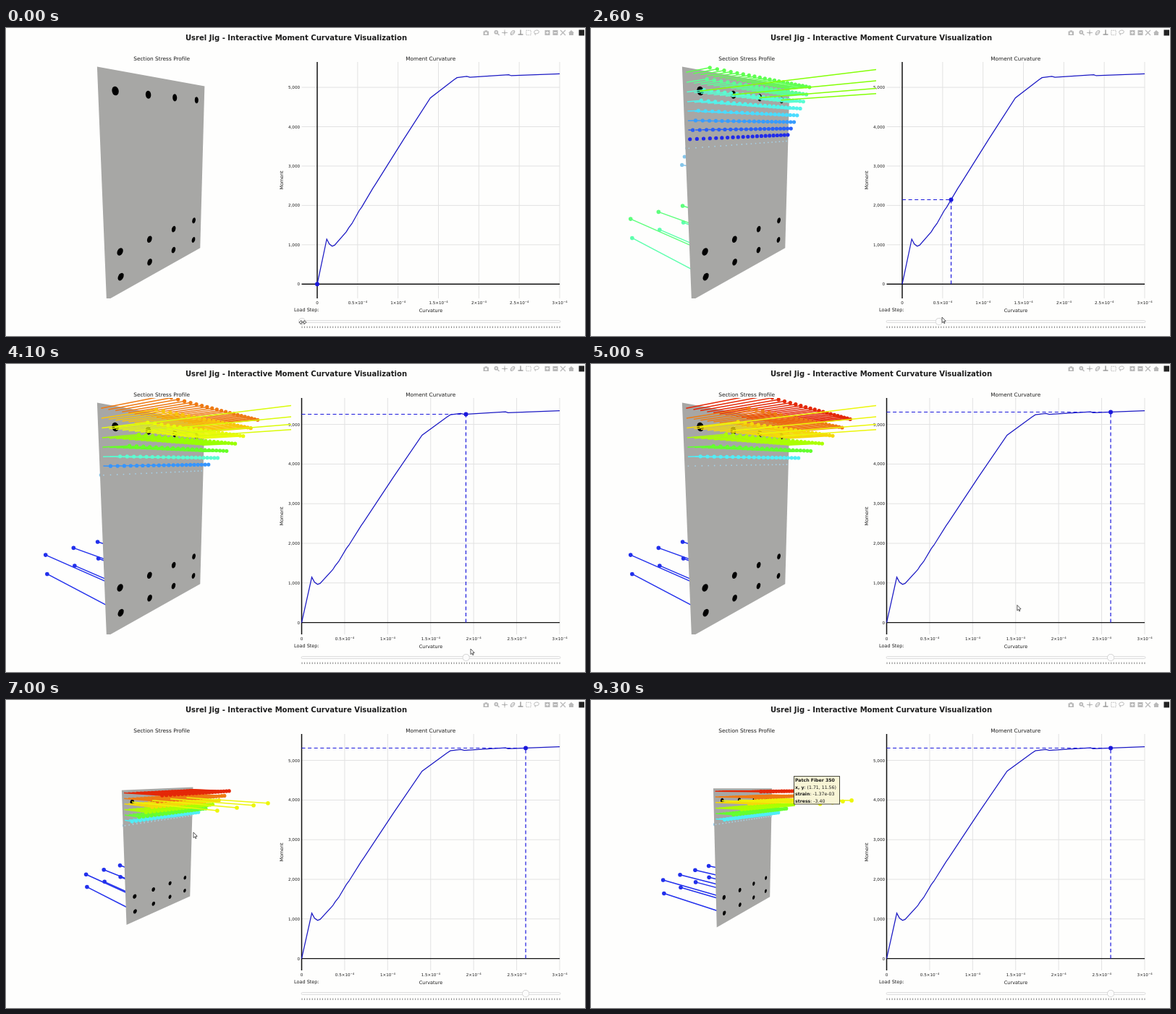
Recreate the animation shown at these times as an HTML page with a canvas. Size 800x426 px, loop 9.4 s.

```html
<!DOCTYPE html>
<html lang="en">
<head>
<meta charset="utf-8">
<title>Moment Curvature</title>
<style>
html, body { margin: 0; width: 100%; height: 100%; overflow: hidden; background: #fefefd; }
canvas { display: block; width: 800px; height: 426px; }
</style>
</head>
<body>
<canvas id="stage" width="800" height="426"></canvas>
<script>
const ctx = document.getElementById('stage').getContext('2d');
const LOOP = 9400, STEP = 100, RESCALE = 3000, TIP_START = 8300;
const FONT = '"DejaVu Sans", Verdana, sans-serif';
const BLUE = '#1a18dc';

// Keyed values: [time, ...values]
const CURVATURE = [[0, 0], [900, 0], [1900, .3], [2600, .605], [4100, 1.91], [4900, 2.605]];
const CAMERA = [[0, 48.5, 10.9, 35.3], [5300, 48.5, 10.9, 35.3], [5900, 32.6, 22, 35.3],
  [6400, 34, 21, 55], [7000, 44.8, 15.05, 55], [7800, 54.1, 12.6, 55]];
const POINTER = [[0, 410, 407], [900, 410, 407], [1900, 449, 406], [2600, 485, 400], [4100, 642, 394],
  [4900, 722, 398], [5250, 256, 172], [5900, 268, 202], [6400, 268, 202], [7000, 259, 183],
  [7800, 252, 176], [8300, 281, 125]];
// Curvature to neutral axis height, and curvature to moment
const AXIS = [[0, 0], [.12, .1], [.2, 3.4], [.3, 4.25], [.605, 4.95], [1.91, 5.57], [2.6, 6.29]];
const MOMENT = [[0, 0], [.118, 1145], [.15, 1020], [.185, 965], [.215, 990], [.36, 1330], [.39, 1430],
  [.43, 1540], [.52, 1870], [.55, 1955], [.69, 2440], [.725, 2550], [1.07, 3680], [1.4, 4730],
  [1.69, 5190], [1.73, 5245], [1.85, 5278], [1.89, 5255], [2.37, 5320], [2.4, 5295], [3, 5345]];
const RAMP = [[30, 20, 230], [44, 115, 252], [78, 235, 255], [92, 255, 205], [95, 255, 60], [115, 255, 10],
  [165, 255, 0], [235, 250, 10], [250, 200, 10], [238, 122, 20], [228, 40, 8]];

const clamp = (v, a, b) => Math.min(b, Math.max(a, v));

function at(keys, t) {
  const i = keys.findIndex(k => k[0] > t);
  if (i < 0) return keys[keys.length - 1].slice(1);
  const a = keys[i - 1], b = keys[i], f = (t - a[0]) / (b[0] - a[0]);
  return a.slice(1).map((v, j) => v + (b[j + 1] - v) * f);
}

function ramp(t) {
  const s = clamp(t, 0, 1) * (RAMP.length - 1), i = Math.min(Math.floor(s), RAMP.length - 2);
  return `rgb(${RAMP[i].map((v, j) => Math.round(v + (RAMP[i + 1][j] - v) * (s - i)))})`;
}

function path(points, close) {
  ctx.beginPath();
  points.forEach(p => ctx.lineTo(p[0], p[1]));
  if (close) ctx.closePath();
}

function line(x1, y1, x2, y2, color, width = 1) {
  path([[x1, y1], [x2, y2]]);
  ctx.strokeStyle = color;
  ctx.lineWidth = width;
  ctx.stroke();
}

function dot(x, y, r, color) {
  ctx.beginPath();
  ctx.arc(x, y, r, 0, 7);
  ctx.fillStyle = color;
  ctx.fill();
}

function text(str, x, y, size, align = 'center', weight = '') {
  ctx.font = `${weight} ${size}px ${FONT}`;
  ctx.textAlign = align;
  ctx.fillStyle = '#1c1c1c';
  ctx.fillText(str, x, y);
  return ctx.measureText(str).width;
}

function clipped(x, y, w, h, draw) {
  ctx.save();
  ctx.beginPath();
  ctx.rect(x, y, w, h);
  ctx.clip();
  draw();
  ctx.restore();
}

// Perspective view of a section 18 wide and 24 high, w along its normal
function projector([yaw, pitch, dist]) {
  const r = Math.PI / 180;
  const ca = Math.cos(yaw * r), sa = Math.sin(yaw * r), cp = Math.cos(pitch * r), sp = Math.sin(pitch * r);
  return (x, y, w) => {
    const fwd = x * sa - w * ca, z = dist + fwd * cp - y * sp, k = 394.7 / z;
    return [215 + (x * ca + w * sa) * k, 210.5 - (y * cp + fwd * sp) * k, z];
  };
}

const BARS = [10, -7, -10].flatMap(y => [-7, -7 / 3, 7 / 3, 7].map(x => [x, y]));

function barColor(s) {
  return ramp(s > 0 ? .455 + .009 * s : .455 + .0035 * s - .00006 * s * s);
}

function sticks(phi) {
  const list = [], na = at(AXIS, phi)[0];
  const strain = y => phi * 1e-4 * (y - na);
  const add = (x, y, s, color, r) => list.push({ x, y, w: clamp(s * 2.56, -16.8, 17), color, r });
  for (let row = 0; row < 27; row++) {
    const y = 12 - (row + .5) * 24 / 27, e = strain(y);
    if (e < -1.6e-4) break;
    const q = e / .00222, s = e > 0 ? 4 * (2 * q - q * q) : 3605 * e;
    const color = e > 0 ? ramp(s / 3.4) : '#86c6ea';
    for (let col = 0; col < 21; col++) add((col - 10) * 18 / 21, y, s, color, 2.6);
  }
  for (const [x, y] of BARS) {
    const s = clamp(29000 * strain(y), -60, 60);
    add(x, y, s, barColor(s), 2.8);
  }
  return list;
}

function drawSection(phi, camera) {
  const project = projector(camera);
  const list = phi > 0 ? sticks(phi) : [];
  for (const s of list) {
    s.base = project(s.x, s.y, 0);
    s.tip = project(s.x, s.y, s.w);
  }
  list.sort((a, b) => b.tip[2] - a.tip[2]);
  const draw = s => {
    line(...s.base.slice(0, 2), ...s.tip.slice(0, 2), s.color, 1.5);
    dot(s.tip[0], s.tip[1], s.r, s.color);
  };
  list.filter(s => s.w <= 0).forEach(draw);
  path([[-9, 12], [9, 12], [9, -12], [-9, -12]].map(([x, y]) => project(x, y, 0)), true);
  ctx.fillStyle = '#a7a7a5';
  ctx.fill();
  for (const [x, y] of BARS) {
    const ring = Array.from({ length: 16 }, (_, i) =>
      project(x + .43 * Math.cos(i * Math.PI / 8), y + .43 * Math.sin(i * Math.PI / 8), .1));
    path(ring, true);
    ctx.fillStyle = '#000';
    ctx.fill();
  }
  // Near-zero tension just shows through the face
  for (const s of list) if (s.w <= 0 && s.w > -.45) dot(s.base[0], s.base[1], .9, '#a6d0e6');
  list.filter(s => s.w > 0).forEach(draw);
}

function drawChart(phi, padded) {
  const x0 = padded ? 430 : 408.5, y0 = padded ? 354.3 : 357.6, ky = padded ? .05445 : .0548;
  const px = v => x0 + v * (765 - x0) / 3, py = m => y0 - m * ky;
  for (let i = 0; i <= 6; i++) {
    const x = px(i / 2);
    if (i) line(x, 47, x, 374, '#e2e2e2');
    if (!i) text('0', x, 382.3, 5.6);
    else {
      const base = `${i / 2}×10`;
      ctx.font = `5.6px ${FONT}`;
      const left = x - (ctx.measureText(base).width + 5.5) / 2;
      const w = text(base, left, 382.3, 5.6, 'left');
      text('−4', left + w, 380, 3.9, 'left');
    }
  }
  for (let m = 0; m <= 5000; m += 1000) {
    const y = py(m);
    if (m) line(408.5, y, 765, y, '#e2e2e2');
    text(m.toLocaleString('en-US'), 406, y + 2, 5.6, 'right');
  }
  line(408.5, y0, 765, y0, '#111', 1.4);
  line(x0, 47, x0, 374, '#111', 1.5);
  path(MOMENT.map(([c, m]) => [px(c), py(m)]));
  ctx.strokeStyle = '#1a18c4';
  ctx.lineWidth = 1.25;
  ctx.stroke();

  const x = px(phi), y = py(at(MOMENT, phi)[0]);
  if (phi > 0) {
    ctx.setLineDash([5, 3.6]);
    line(x0, y, x, y, BLUE, 1.2);
    line(x, y0, x, y, BLUE, 1.2);
    ctx.setLineDash([]);
  }
  dot(x, y, 3, BLUE);
}

function drawSlider(phi) {
  text('Load Step:', 398, 391.5, 6.5, 'left');
  ctx.beginPath();
  ctx.roundRect(408, 404.5, 358, 3, 1.5);
  ctx.fillStyle = '#fafafa';
  ctx.fill();
  ctx.strokeStyle = '#d4d4d4';
  ctx.lineWidth = .7;
  ctx.stroke();
  for (let i = 0; i <= 100; i++) line(409 + i * 3.56, 412.5, 409 + i * 3.56, 415, '#555', .7);
  const x = 409 + phi / 3 * 356;
  dot(x, 406, 5, '#cfcfcf');
  dot(x, 406, 4.3, '#fcfcfc');
}

function drawToolbar() {
  const gray = '#b9b9b9';
  ctx.fillStyle = gray;
  ctx.fillRect(659.5, 4.5, 7.5, 5.5);
  ctx.fillRect(661.5, 3.3, 3.5, 2);
  dot(663.2, 7.2, 1.6, '#fefefd');
  dot(677.3, 5.8, 2.9, gray);
  dot(677.3, 5.8, 1, '#fefefd');
  line(679, 7.5, 681.5, 10, gray, 1.4);
  line(685, 6.5, 693, 6.5, gray);
  line(689, 2.5, 689, 10.5, gray);
  dot(689, 6.5, 1.5, gray);
  ctx.strokeStyle = gray;
  ctx.lineWidth = 1.2;
  ctx.beginPath();
  ctx.ellipse(700, 6.5, 3.4, 2, -.9, 0, 7);
  ctx.stroke();
  line(697, 9.5, 703, 4, gray);
  line(711, 2.5, 711, 9, '#858585', 1.2);
  line(707.5, 9, 714.5, 9, '#858585', 1.2);
  ctx.strokeStyle = gray;
  ctx.lineWidth = 1;
  ctx.setLineDash([1.5, 1]);
  ctx.strokeRect(718.8, 3.3, 6.4, 6.4);
  ctx.setLineDash([]);
  ctx.beginPath();
  ctx.ellipse(733, 5.5, 3.4, 2.4, -.2, 0, 7);
  ctx.stroke();
  line(730.5, 7, 731.5, 10, gray);
  for (const x of [748, 759]) {
    ctx.fillStyle = gray;
    ctx.fillRect(x - 3.5, 3, 7, 7);
    line(x - 2, 6.5, x + 2, 6.5, '#fefefd');
  }
  line(748, 4.5, 748, 8.5, '#fefefd');
  line(766, 3, 773, 10, gray, 1.2);
  line(773, 3, 766, 10, gray, 1.2);
  path([[777, 6.8], [781, 3], [785, 6.8], [784, 6.8], [784, 10], [778, 10], [778, 6.8]], true);
  ctx.fillStyle = gray;
  ctx.fill();
  ctx.fillStyle = '#222';
  ctx.fillRect(791.5, 2.5, 7.5, 8);
}

function drawPointer(x, y, resize) {
  ctx.save();
  ctx.translate(x, y);
  if (resize) path([[-5, 0], [-2, -2.5], [-2, -.8], [2, -.8], [2, -2.5], [5, 0], [2, 2.5], [2, .8], [-2, .8], [-2, 2.5]], true);
  else path([[0, 0], [0, 7.6], [1.7, 6], [2.9, 8.6], [4, 8.1], [2.9, 5.6], [5.2, 5.4]], true);
  ctx.fillStyle = '#fff';
  ctx.fill();
  ctx.strokeStyle = '#333';
  ctx.lineWidth = .8;
  ctx.stroke();
  ctx.restore();
}

function drawTip() {
  ctx.fillStyle = '#f8f5d6';
  ctx.fillRect(280.5, 105.5, 63, 38.5);
  ctx.strokeStyle = '#4a4a40';
  ctx.lineWidth = 1;
  ctx.strokeRect(280.5, 105.5, 63, 38.5);
  const rows = [['Patch Fiber 350', ''], ['x, y', ': (1.71, 11.56)'], ['strain', ': -1.37e-03'], ['stress', ': -3.40']];
  rows.forEach(([label, value], i) => {
    const y = 113 + i * 9.6, w = text(label, 282, y, 6.2, 'left', 'bold');
    text(value, 282 + w, y, 6.2, 'left');
  });
}

function render(t) {
  const phi = at(CURVATURE, t)[0];
  ctx.fillStyle = '#fefefd';
  ctx.fillRect(0, 0, 800, 426);
  text('Usrel Jig - Interactive Moment Curvature Visualization', 401, 16.5, 10.05, 'center', 'bold');
  text('Section Stress Profile', 215.2, 44.6, 7.4);
  text('Moment Curvature', 586.7, 44.6, 7.35);
  text('Curvature', 587, 392.5, 6.5);
  ctx.save();
  ctx.translate(383, 210.5);
  ctx.rotate(-Math.PI / 2);
  text('Moment', 0, 0, 6.4);
  ctx.restore();
  drawToolbar();
  drawChart(phi, t < RESCALE);
  drawSlider(phi);
  clipped(36, 47, 358, 327, () => drawSection(phi, at(CAMERA, t)));
  if (t < TIP_START) drawPointer(...at(POINTER, t), t < 2300);
  else drawTip();
}

function tick(now) {
  render(Math.floor(now % LOOP / STEP) * STEP);
  requestAnimationFrame(tick);
}
render(0);
requestAnimationFrame(tick);
</script>
</body>
</html>
```
